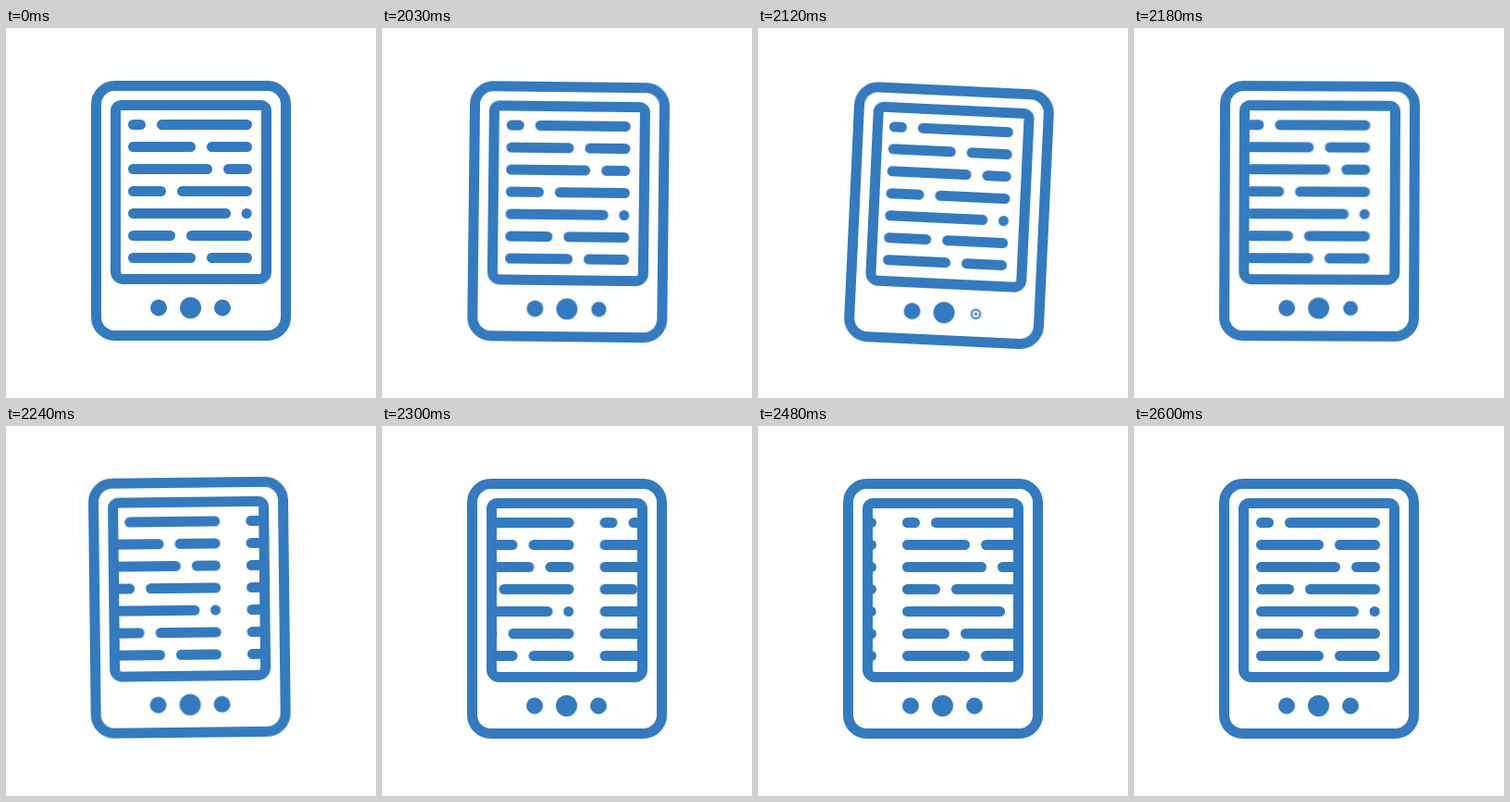
An HTML page without scripts for the animation above (2690 ms loop, 400 by 400 pixels).

```html
<!DOCTYPE html>
<html lang="en">
<head>
<meta charset="utf-8">
<title>Reader turning a page</title>
<style>
  html, body { margin: 0; width: 100%; height: 100%; overflow: hidden; background: #fff; }
  svg { display: block; width: 100vw; height: 100vh; }

  .line { fill: none; stroke: #347abf; stroke-width: 11; }
  .text { stroke-linecap: round; }
  .dot { fill: #347abf; }

  .device, .pages, .next { animation: 2690ms infinite; }
  .device { transform-origin: 92px 338px; animation-name: tilt; }
  .next { stroke-width: 8.6px; animation-name: press; }
  .pages { animation-name: slide; animation-timing-function: step-end; }

  @keyframes tilt {
    0% { transform: rotate(0deg); }
    75.46% { transform: rotate(0deg); animation-timing-function: steps(4, start); }
    79.92% { transform: rotate(2.7deg); animation-timing-function: steps(3, start); }
    83.27% { transform: rotate(-1deg); animation-timing-function: steps(3, start); }
    86.61%, 100% { transform: rotate(0deg); }
  }

  @keyframes press {
    0% { stroke-width: 8.6px; }
    75.46% { stroke-width: 8.6px; animation-timing-function: steps(4, start); }
    79.92% { stroke-width: 2px; animation-timing-function: steps(3, start); }
    83.27%, 100% { stroke-width: 8.6px; }
  }

  /* one page is 162px wide; it speeds up, cruises and settles */
  @keyframes slide {
    0% { transform: translateX(0); }
    78.81% { transform: translateX(-1px); }
    79.92% { transform: translateX(-5px); }
    81.04% { transform: translateX(-11.5px); }
    82.15% { transform: translateX(-20.5px); }
    83.27% { transform: translateX(-32px); }
    84.38% { transform: translateX(-45px); }
    85.5% { transform: translateX(-58.5px); }
    86.61% { transform: translateX(-72.2px); }
    87.73% { transform: translateX(-86px); }
    88.84% { transform: translateX(-99.8px); }
    89.96% { transform: translateX(-113.3px); }
    91.07% { transform: translateX(-126.2px); }
    92.19% { transform: translateX(-138px); }
    93.3% { transform: translateX(-148.3px); }
    94.42% { transform: translateX(-156px); }
    95.53% { transform: translateX(-160px); }
    96.65%, 100% { transform: translateX(-162px); }
  }
</style>
</head>
<body>
<svg viewBox="0 0 400 400">
  <defs>
    <clipPath id="screen"><rect x="120" y="85" width="160" height="185"/></clipPath>
    <path id="page" class="line text" d="
      M137.5 104.5h8m23 0h92
      M137.5 128.5h62m23 0h38
      M137.5 152.5h80m23 0h20
      M137.5 176.5h30m23 0h70
      M137.5 200.5h100m22.6 0h.1
      M137.5 224.5h40m23 0h60
      M137.5 248.5h62m23 0h38"/>
  </defs>
  <g class="device">
    <rect class="line" x="97.5" y="62.5" width="205" height="270" rx="20"/>
    <g clip-path="url(#screen)">
      <g class="pages">
        <use href="#page"/>
        <use href="#page" x="162"/>
      </g>
    </g>
    <path class="line" d="M124.5 83.5h151a6 6 0 0 1 6 6v174a8 8 0 0 1-8 8h-147a8 8 0 0 1-8-8v-174a6 6 0 0 1 6-6z"/>
    <circle class="dot" cx="165" cy="302.5" r="9"/>
    <circle class="dot" cx="199.5" cy="302.5" r="11.5"/>
    <circle class="dot" cx="234" cy="302.5" r="1.7"/>
    <circle class="next" cx="234" cy="302.5" r="4.7" fill="none" stroke="#347abf"/>
  </g>
</svg>
</body>
</html>
```
